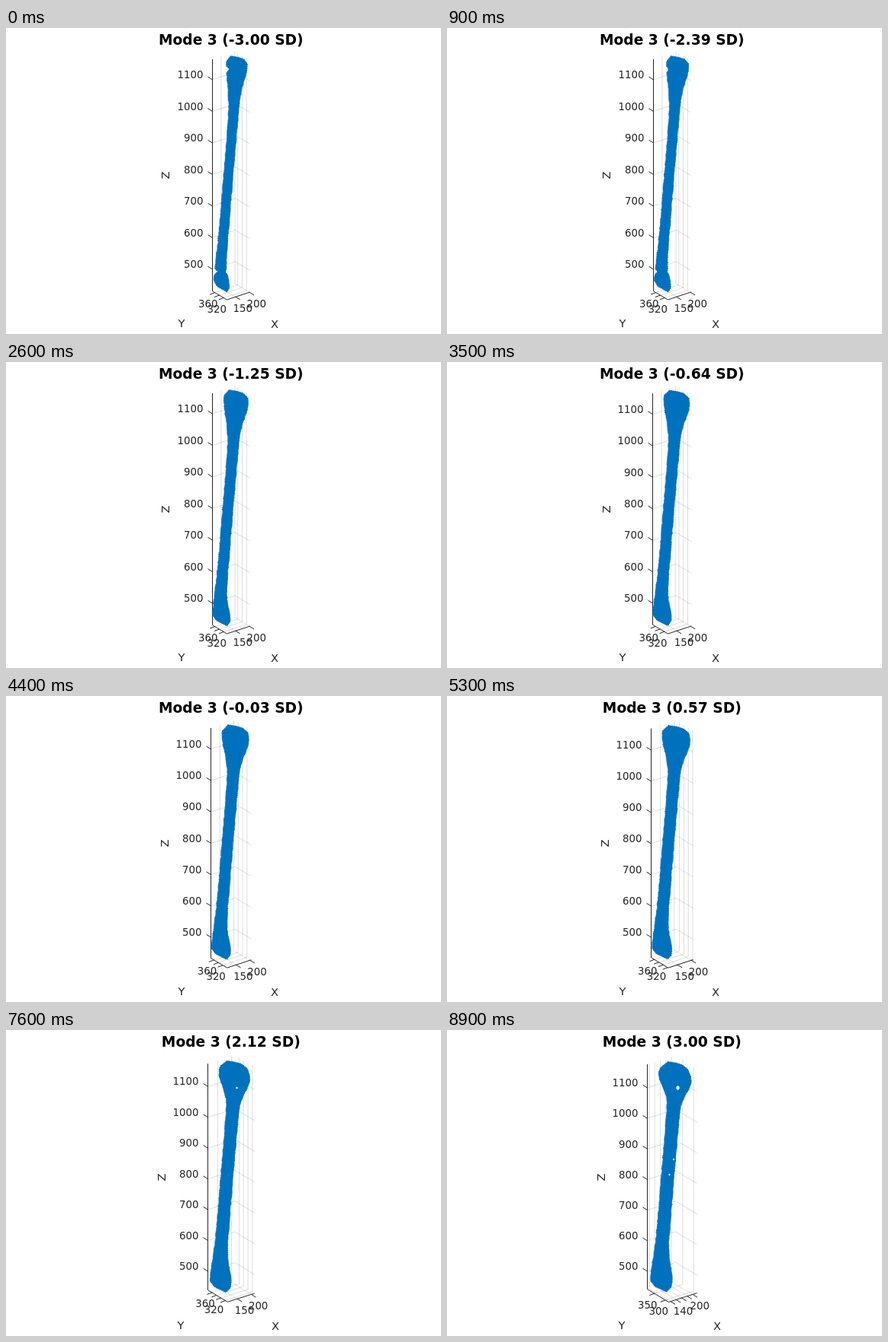
These frames come from a looping animation (570 by 402 pixels, 9000 ms). An HTML page:

```html
<!DOCTYPE html>
<html lang="en">
<head>
<meta charset="utf-8">
<title>Shape mode</title>
<style>
  html, body { margin: 0; width: 100%; height: 100%; overflow: hidden; background: #fff; }
  svg { display: block; width: 570px; height: 402px; font: 13.33px "DejaVu Sans", sans-serif; fill: #262626; }
  #title { font-size: 18.67px; font-weight: bold; fill: #000; }
  .name { font-size: 14.67px; }
  path { fill: none; }
  #grid { stroke: #262626; stroke-opacity: .15; }
  #axes { stroke: #262626; }
  #bone { fill: #0072bd; }
  #rim { stroke: #0072bd; stroke-width: 2.6; stroke-linecap: round; stroke-dasharray: 0 2.5; }
  #holes { fill: #fff; }
</style>
</head>
<body>
<svg viewBox="0 0 570 402" text-anchor="middle">
  <path id="grid"/>
  <path id="axes"/>
  <path id="bone"/>
  <path id="rim"/>
  <g id="holes"></g>
  <g id="labels"></g>
  <text id="title" x="294.8" y="21.5"></text>
  <text id="xName" class="name" y="393.8">X</text>
  <text id="yName" class="name" y="392.8">Y</text>
  <text id="zName" class="name">Z</text>
</svg>
<script>
const STEPS = 90, STEP_MS = 100, TICK_SWITCH_SD = 2.4;
const $ = id => document.getElementById(id);
const mix = (a, b, k) => a + (b - a) * k;
const bump = (y, center, width) => Math.exp(-(((y - center) / width) ** 2));
const noise = n => Math.abs(Math.sin(n * 12.9898) * 43758.5453) % 1 - .5;
const line = (x1, y1, x2, y2) => `M${x1} ${y1}L${x2} ${y2}`;
const label = (x, y, s, anchor = "middle") => `<text x="${x}" y="${y}" text-anchor="${anchor}">${s}</text>`;

// The plot box stays put until the bone outgrows it
const growth = sd => Math.max(0, sd + 1);

function drawAxes(sd) {
  const g = growth(sd), late = sd > TICK_SWITCH_SD;
  const left = { x: Math.floor(270 - 1.8 * g) + .5, y: 345.7 - 1.3 * g };
  const front = { x: 289.5 + .25 * g, y: 357 + .1 * g };
  const right = { x: 319.5 + 2 * g, y: 347 - .35 * g };
  const back = { x: left.x + right.x - front.x, y: left.y + right.y - front.y };
  const top = 41 + g, height = left.y - top;
  let grid = "", labels = "";
  let axes = `M${left.x} ${top}V${left.y}L${front.x} ${front.y}L${right.x} ${right.y}`;

  for (let z = 500; z <= 1100; z += 100) {
    const y = mix(317, 68 + 2 * g, (z - 500) / 600), rise = y - left.y;
    grid += `M${left.x} ${y}L${back.x} ${back.y + rise}L${right.x} ${right.y + rise}`;
    axes += line(left.x, y, left.x - 6, y - 3.8);
    labels += label(left.x - 12, y - 1.8, z, "end");
  }

  // Ticks along a floor edge, with grid lines over the floor and up the far wall
  function floorTicks({ from, to, side, first, last, step, every, toX, dx, dy, labelDx }) {
    for (let v = first; v <= last; v += step) {
      const x = toX(v);
      if (x < from.x || x > to.x) continue;
      const y = mix(from.y, to.y, (x - from.x) / (to.x - from.x));
      const wallX = x + side.x - front.x, wallY = y + side.y - front.y;
      grid += `M${x} ${y}L${wallX} ${wallY}v${-height}`;
      axes += line(x, y, x + dx, y + dy);
      if ((v - first) % every === 0) labels += label(x + labelDx, y + 19.5, v);
    }
  }
  floorTicks({
    from: front, to: right, side: left, first: late ? 80 : 100, last: 220,
    step: late ? 20 : 50, every: late ? 60 : 50,
    toX: v => 319 + .75 * g + (v - 200) * .363, dx: 6, dy: 3.7, labelDx: 9.3
  });
  floorTicks({
    from: left, to: front, side: right, first: late ? 300 : 280, last: 400,
    step: late ? 50 : 20, every: late ? 50 : 40,
    toX: v => 285.3 - 1.2 * g - (v - 320) * .29, dx: -6.5, dy: 2.4, labelDx: -9
  });

  $("grid").setAttribute("d", grid);
  $("axes").setAttribute("d", axes);
  $("labels").innerHTML = labels;
  $("xName").setAttribute("x", Math.round(351.7 + .45 * g));
  $("yName").setAttribute("x", Math.round(230.4 - .3 * g));
  $("zName").setAttribute("transform", `translate(${Math.round(214.4 - 1.75 * g)} 193.5) rotate(-90)`);
}

// A slanted shaft, widened by a head and a foot; two notches open at low deviations
function boneEdges(sd) {
  const center = y => 306.4 - .083 * y - .38 * sd;
  const shaft = 6.6 + .37 * sd;
  const open = Math.min(1, Math.max(0, (-sd - 1) / 2));
  return {
    left: y => center(y) - shaft
      - (12 + .9 * sd) * bump(y, 48 + 2.9 * sd, 33 - 3.5 * sd)
      - (2.6 + .25 * sd) * bump(y, 325, 35)
      + open * 5 * (bump(y, 54, 2.5) + bump(y, 320, 2.5)),
    right: y => center(y) + shaft
      + (9.4 + .9 * sd) * bump(y, 60 + 2.8 * sd, 23.5 - sd)
      + 8.5 * bump(y, 340 - 3.5 * sd, 27)
      - open * 3 * bump(y, 320, 2.5)
  };
}

function drawBone(sd) {
  const { left, right } = boneEdges(sd);
  const g = growth(sd);
  const top = 37.5 + 1.2 * g, bottom = 346 - .7 * g;
  const points = [];
  const add = (x, y) => points.push(`${x.toFixed(2)} ${y.toFixed(2)}`);
  const cap = (y, k, dy) => add(mix(left(y), right(y), k), y + dy);

  cap(top, .2, 0);
  cap(top, .55, 1.5);
  cap(top, .85, 4);
  for (let y = top + 10; y < bottom - 4; y += 3) add(right(y) + noise(points.length), y);
  cap(bottom, .85, 0);
  cap(bottom, .6, -3);
  cap(bottom, .25, -7);
  for (let y = bottom - 14; y > top + 5; y -= 3) add(left(y) + noise(points.length), y);

  const d = `M${points.join("L")}Z`;
  $("bone").setAttribute("d", d);
  $("rim").setAttribute("d", d);
}

// Gaps between the points widen as the bone is stretched
function drawHoles(sd) {
  const hole = (x, y, radius, opens) => {
    const r = radius * Math.max(0, (sd - opens) / (3 - opens));
    return `<ellipse cx="${x}" cy="${y}" rx="${r}" ry="${r * 1.2}"/>`;
  };
  $("holes").innerHTML = hole(302.5, 76, 2.2, 1.2) + hole(297, 170, 1, 1.9) + hole(291.5, 190, 1, 1.7);
}

let shown = -1;
function render(time) {
  const step = Math.floor(time / STEP_MS) % STEPS;
  if (step === shown) return;
  shown = step;
  const sd = -3 + 6 * step / (STEPS - 1);
  drawAxes(sd);
  drawBone(sd);
  drawHoles(sd);
  $("title").textContent = `Mode 3 (${sd.toFixed(2)} SD)`;
}

let start;
function tick(now) {
  start ??= now;
  render(now - start);
  requestAnimationFrame(tick);
}
render(0);
requestAnimationFrame(tick);
</script>
</body>
</html>
```
